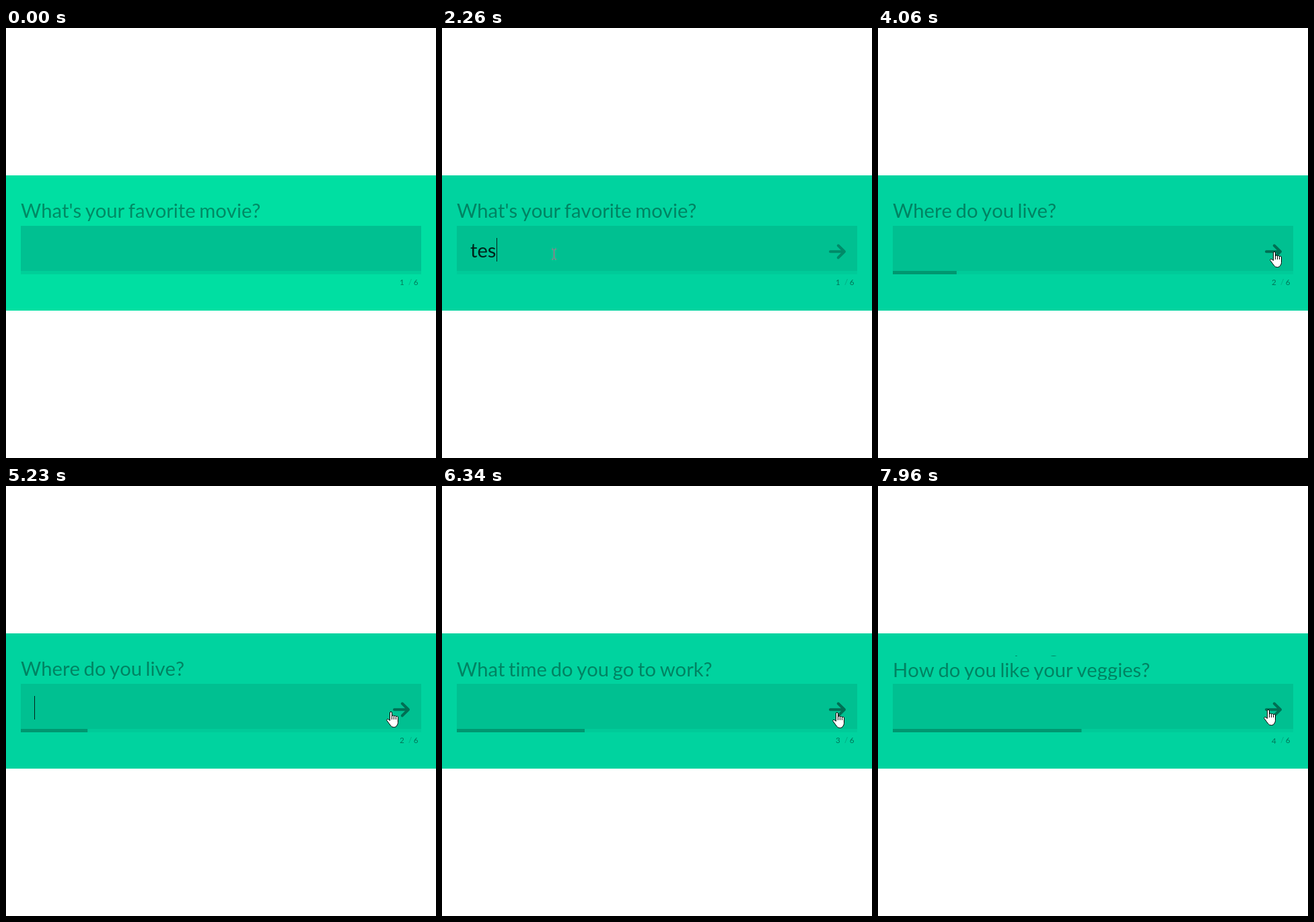
These frames come from a looping animation (639x639 px, 8 s). An HTML page:

```html
<!DOCTYPE html>
<html lang="en">
<head>
<meta charset="utf-8">
<title>Minimal form</title>
<style>
html, body { margin: 0; width: 100%; height: 100%; overflow: hidden; background: #fff; }
svg {
  display: block; width: 639px; height: 639px; font: 29.2px Lato, sans-serif;
  font-kerning: none; font-variant-ligatures: none;
}
.small { font-size: 11.7px; }
</style>
</head>
<body>
<svg id="stage" viewBox="0 0 639 639">
  <defs>
    <clipPath id="band"><rect y="219" width="639" height="201"/></clipPath>
    <clipPath id="line"><rect y="252" width="639" height="36"/></clipPath>
    <clipPath id="count"><rect x="580" y="370" width="40" height="15"/></clipPath>
  </defs>
  <rect id="bg" y="219" width="639" height="201"/>
  <g clip-path="url(#line)" fill-opacity=".38">
    <text id="qOld" x="22"/><text id="qNew" x="22"/>
  </g>
  <rect x="22" y="294" width="595" height="67" fill="#00c091"/>
  <rect id="track" x="22" y="361" width="595" height="5"/>
  <rect id="bar" x="22" y="361" height="5" fill="#009770"/>
  <text id="value" x="42" y="341" fill-opacity=".82"/>
  <rect id="caret" y="312" width="1" height="35" fill="#04211a"/>
  <path id="next" d="M577 332.3H597.5M588.8 323.3L598 332.3L588.8 341.3" fill="none" stroke="#000"
    stroke-width="4" stroke-linecap="round" stroke-linejoin="round"/>
  <g class="small" fill-opacity=".45">
    <g clip-path="url(#count)"><text id="nOld" x="585"/><text id="nNew" x="585"/></g>
    <text x="598" y="382" fill-opacity=".2">/</text>
    <text x="605.7" y="382">6</text>
  </g>
  <g clip-path="url(#band)">
    <g id="pointer">
      <path id="arrow" d="M.5 .5V17L4.4 13.4L7 19.3L9.5 18.2L7 12.4H12Z" fill="#fff" stroke="#000"/>
      <path id="beam" d="M-3 -7.5H-.5M1.5 -7.5H4M.5 -7V7M-3 7.5H-.5M1.5 7.5H4" fill="none" stroke="#e65a8a"/>
      <g id="hand" fill="#fff" stroke="#000" stroke-linejoin="round">
        <path d="M-.5 13.5V2a1.5 1.5 0 0 1 3 0V7a1.5 1.3 0 0 1 3 .5a1.5 1.3 0 0 1 3 .7a1.5 1.3 0 0 1 3 .8V16.5Q11.5 19 9.8 21Q9 23.5 5.5 23.5Q2 23.5 .5 21L-5 13.5Q-5.7 12 -4.5 11.5Q-3 11 -.5 13.5Z"/>
        <path d="M2.5 7V12M5.5 7.5V12M8.5 8.2V12" fill="none"/>
      </g>
    </g>
  </g>
</svg>
<script>
const LOOP = 8000, SLIDE = 400, BLINK = 525, FOCUS = 940, SPACE = .193;
const questions = ["What's your favorite movie?", "Where do you live?",
  "What time do you go to work?", "How do you like your veggies?"];
const numbers = questions.map((q, i) => String(i + 1));
const slides = [3720, 6022, 7676];
const keys = [[1710, "t"], [2020, "e"], [2260, "s"], [2630, "t"], [5480, "2"], [7020, "3"]];
// start, duration, x, y and downward bow of each pointer move
const moves = [[460, 300, 166, 336], [2650, 510, 570, 344, 75], [3160, 170, 579, 330],
  [3450, 70, 588, 332], [4290, 100, 571, 335], [5470, 70, 586, 342],
  [5710, 70, 586, 336], [6780, 220, 574, 332], [7340, 40, 579, 332]];
const resets = [FOCUS, ...keys.map(k => k[0]), ...slides.map(s => s + SLIDE)].sort((a, b) => a - b);

const el = {};
document.querySelectorAll("[id]").forEach(n => el[n.id] = n);
const set = (n, attrs) => { for (const k in attrs) n.setAttribute(k, attrs[k]); };
const show = (n, on) => n.setAttribute("visibility", on ? "visible" : "hidden");
const clamp = v => Math.max(0, Math.min(1, v));

function bezier(x1, y1, x2, y2) {
  const at = (a, b, u) => 3 * a * u * (1 - u) ** 2 + 3 * b * u * u * (1 - u) + u ** 3;
  return x => {
    if (x <= 0 || x >= 1) return clamp(x);
    let lo = 0, hi = 1;
    for (let i = 0; i < 24; i++) {
      const mid = (lo + hi) / 2;
      if (at(x1, x2, mid) < x) lo = mid; else hi = mid;
    }
    return at(y1, y2, lo);
  };
}
const ease = bezier(.25, .1, .25, 1);
const easeInOut = bezier(.42, 0, .58, 1);

// Keep word gaps the same in every version of the font.
function fitSpaces() {
  const pen = document.createElement("canvas").getContext("2d");
  pen.font = "100px Lato, sans-serif";
  el.stage.style.wordSpacing = (SPACE - pen.measureText(" ").width / 100) * 29.2 + "px";
}

function pointerAt(t) {
  let x = 185, y = 424;
  for (const [t0, span, toX, toY, bow = 0] of moves) {
    const k = ease(clamp((t - t0) / span));
    x += (toX - x) * k;
    y += (toY - y) * k + bow * Math.sin(Math.PI * k);
  }
  return [Math.round(x), Math.round(y)];
}

function drawPointer(t) {
  const [x, y] = pointerAt(t);
  const inside = y > 294 && y < 361;
  const kind = t < 460 ? null : !inside ? el.arrow : x > 548 ? el.hand : el.beam;
  for (const n of [el.arrow, el.beam, el.hand]) show(n, n === kind);
  set(el.pointer, { transform: `translate(${x} ${y})` });
}

function slidePair(oldText, newText, texts, i, k, base, step) {
  oldText.textContent = texts[i];
  newText.textContent = texts[i + 1] || "";
  set(oldText, { y: base - step * k });
  set(newText, { y: base + step * (1 - k) });
}

function drawInput(t, from, since) {
  const text = keys.filter(([at]) => at >= from && at <= t).map(k => k[1]).join("");
  el.value.textContent = text;
  set(el.value, { opacity: 1 - ease(clamp(since / 300)) });

  const last = resets.filter(r => r <= t).pop();
  show(el.caret, t >= FOCUS && since < 0 && Math.floor((t - last) / BLINK) % 2 === 0);
  set(el.caret, { x: Math.round(42 + (text ? el.value.getComputedTextLength() : 0)) });
}

function draw(t) {
  set(el.bg, { fill: t < 460 ? "#00dfa2" : "#00d39f" });
  set(el.track, { fill: t < 460 ? "#00cf99" : "#00cb99" });

  const done = slides.filter(s => t >= s + SLIDE).length;
  const since = done < slides.length ? t - slides[done] : -1;
  const k = ease(clamp(since / SLIDE));
  slidePair(el.qOld, el.qNew, questions, done, k, 282, 36);
  slidePair(el.nOld, el.nNew, numbers, done, k, 382, 15);
  set(el.bar, { width: 595 * (done + easeInOut(clamp(since / SLIDE))) / 6 });
  drawInput(t, done ? slides[done - 1] + SLIDE : 0, since);

  const shown = ease(clamp((t - FOCUS) / 300));
  const hover = ease(clamp((t - 2960) / 300));
  set(el.next, {
    opacity: shown * (.28 + .14 * hover),
    transform: `translate(${-11 * (1 - shown)} 0)`
  });
  drawPointer(t);
}

fitSpaces();
const start = performance.now();
function tick() {
  draw((performance.now() - start) % LOOP);
  requestAnimationFrame(tick);
}
tick();
</script>
</body>
</html>
```
